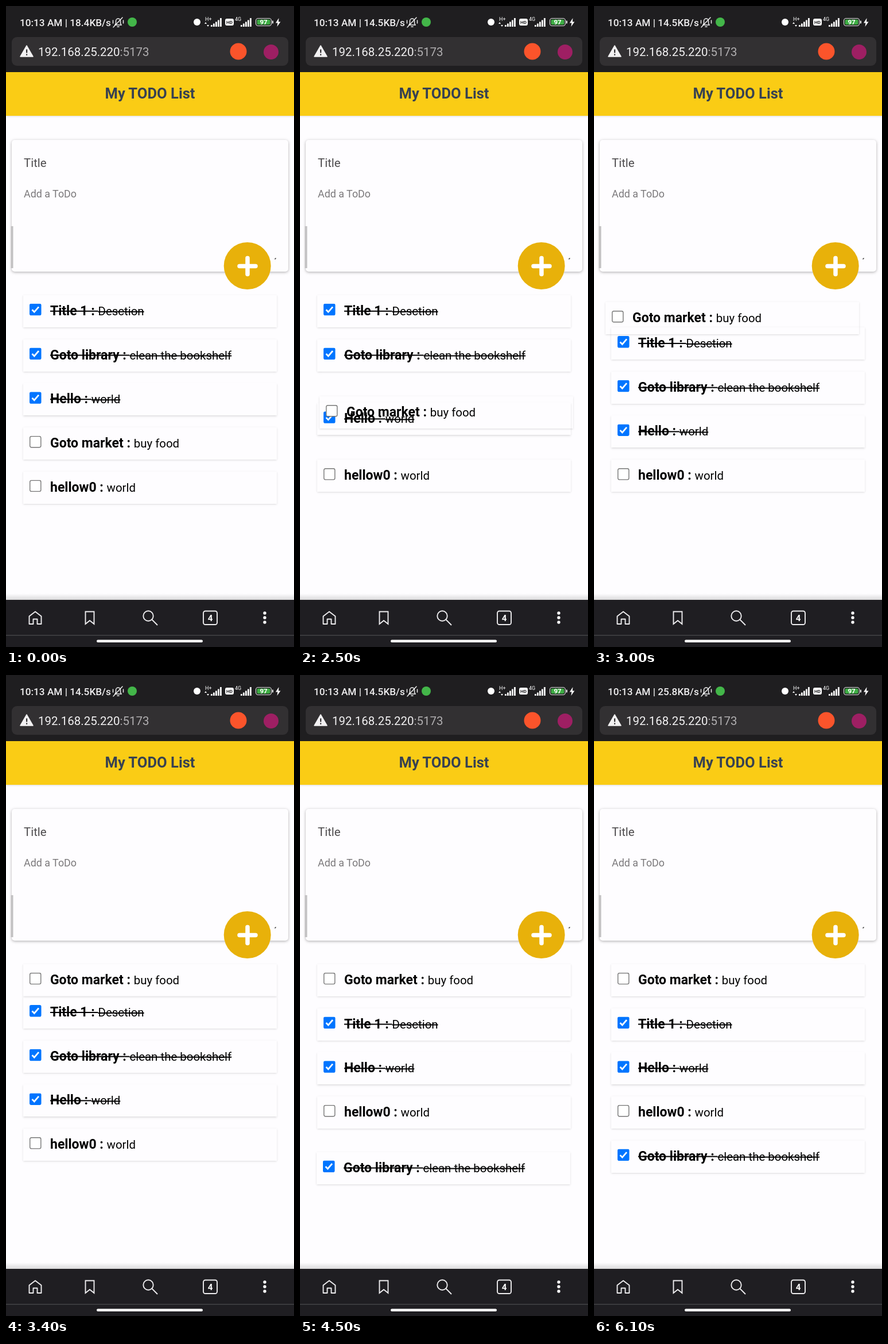
Recreate the animation shown at these times as an HTML page. Size 502 by 1115 pixels, loop 6200 ms.

```html
<!DOCTYPE html>
<html lang="en">
<head>
<meta charset="utf-8">
<title>Todo list</title>
<style>
html, body { margin: 0; width: 100%; height: 100%; overflow: hidden; }
body { position: relative; background: #fefdff; font-family: Roboto, sans-serif; }
body > * { position: absolute; }
header { top: 115px; width: 502px; height: 76px; background: #facc15; box-shadow: 0 1px 3px #0002;
  color: #374151; font: bold 25.55px/75px Roboto, sans-serif; text-align: center; }
.panel { left: 10px; top: 233px; width: 482px; height: 229px; border-radius: 5px; box-shadow: 0 1.3px 5px #8a8989aa; }
.row { left: 30px; top: 0; width: 442px; height: 56.2px; white-space: pre; font-size: 20.44px; line-height: 56px;
  box-shadow: 0 1.3px 3.8px #0000001a, 0 1.3px 2.6px -1.3px #0000001a; color: #000; }
.row svg { position: absolute; left: 10.5px; top: 15px; }
.row p { position: absolute; left: 47px; top: 0; margin: 0; }
.row b { font-size: 23px; }
.done b, .done span { text-decoration: line-through; }
.ui { left: 0; top: 0; z-index: 2; }
</style>
</head>
<body>
<header>My TODO List</header>
<div class="panel"></div>
<svg class="ui" width="502" height="1115" font-family="Roboto, sans-serif" fill="#fff">
  <defs>
    <linearGradient id="fade" x2="0" y2="1"><stop stop-opacity="0"/><stop offset="1" stop-opacity=".14"/></linearGradient>
    <path id="bars" d="M0 12h2.8v3H0zM4 9.5h2.8V15H4zM8 6.5h2.8V15H8zM12 3.5h2.8V15H12zM16 0h2.8v15H16z"/>
  </defs>

  <!-- status bar -->
  <path fill="#1f1e20" d="M0 0h502v115H0z"/>
  <g font-size="17.2" font-weight="500" fill="#f0eff0">
    <text x="24" y="35">10:13 AM | <tspan id="speed"></tspan>KB/s</text>
  </g>
  <g fill="none" stroke="#eee" stroke-width="1.5" stroke-linecap="round">
    <path d="M190 33h11l-1.500-3v-4a4 4 0 0 0-8 0v4zM194 36h3M187 37 203 20M186.500 25v5M204.500 25v5"/>
  </g>
  <circle cx="220" cy="28" r="8" fill="#43b649"/>
  <circle cx="333" cy="28" r="6"/>
  <text x="347" y="26" font-size="9">H+</text>
  <path d="M348 28l2 3h-4zM352 36l2-3h-4z"/>
  <use href="#bars" x="357" y="21"/>
  <rect x="382" y="22" width="15" height="12" rx="3"/>
  <text x="389.500" y="31" font-size="8" font-weight="700" text-anchor="middle" fill="#1f1e20">HD</text>
  <text x="399" y="26" font-size="9">4G</text>
  <use href="#bars" x="409" y="21"/>
  <rect x="435.500" y="21.500" width="27" height="13" rx="4" fill="#1f1e20" stroke="#ddd" stroke-width="1.200"/>
  <rect x="437.500" y="23.500" width="23" height="9" rx="2" fill="#3fae45"/>
  <path d="M464 25.500h1.500q1 2.500 0 5H464z"/>
  <text x="449" y="32.300" font-size="11.500" font-weight="700" text-anchor="middle">97</text>
  <path d="M475.500 21 470 29.500h3.500L472.500 36l6-8.500H475z"/>

  <!-- address bar -->
  <rect x="10" y="54" width="482" height="50" rx="9" fill="#323032"/>
  <path d="M36 69 47 88H25z" fill="#f2f1f2" stroke="#f2f1f2" stroke-width="1.500" stroke-linejoin="round"/>
  <path d="M35 75.500h2.200v6H35zM35 83.500h2.200v2.200H35z" fill="#323032"/>
  <text x="56" y="87" font-size="20.440" fill="#f2f1f2">192.168.25.220<tspan fill="#b0aeb0">:5173</tspan></text>
  <circle cx="405" cy="79" r="14.500" fill="#fb542b"/>
  <circle cx="462" cy="80" r="13" fill="#9e1f63"/>

  <!-- form -->
  <text x="31" y="280" font-size="20.440" fill="#4d4b4d">Title</text>
  <text x="31" y="332.500" font-size="17.900" fill="#7a787a">Add a ToDo</text>
  <rect x="8.500" y="383" width="4" height="73" fill="#c3c2c3"/>
  <path d="M468.500 440.500l2-2" stroke="#333" stroke-width="1.500"/>
  <circle cx="420.700" cy="452" r="41" fill="#e8b10a"/>
  <path d="M407 452.500h28M421 438.500v28" stroke="#fff" stroke-width="7.500" stroke-linecap="round"/>

  <!-- navigation -->
  <path fill="url(#fade)" d="M0 1022h502v11H0z"/>
  <path fill="#1f1e22" d="M0 1033h502v82H0z"/>
  <path fill="#4a494c" d="M0 1094h502v1.300H0z"/>
  <g fill="none" stroke="#eeedef" stroke-width="1.900">
    <path d="M40.500 1061.500 51 1053.500l10.500 8V1075h-7v-8.500h-7v8.500h-7z" stroke-linejoin="round"/>
    <path d="M138.500 1053.500h15V1075l-7.500-6-7.500 6z"/>
    <circle cx="248" cy="1061" r="8.700"/>
    <path d="M254.500 1067.500 264 1077"/>
    <rect x="344" y="1052.500" width="24" height="23.500" rx="3.500"/>
  </g>
  <text x="356" y="1069.500" font-size="15" font-weight="700" text-anchor="middle">4</text>
  <circle cx="451" cy="1056" r="2.700"/><circle cx="451" cy="1064" r="2.700"/><circle cx="451" cy="1072" r="2.700"/>
  <rect x="158" y="1102.500" width="185" height="4.500" rx="2.200"/>
</svg>

<script>
const LOOP = 6200, STEP = 100, GAP = 56.2, SHIFT_MS = 200;
const todos = [
  ['Title 1', 'Desction', true],
  ['Goto library', 'clean the bookshelf', true],
  ['Hello', 'world', true],
  ['Goto market', 'buy food', false],
  ['hellow0', 'world', false],
];
// order: rows before lifting; path: [time, x, y] of the held row, released at its last point;
// shifts: when a row starts to make room (open 1) or to close up (open 0)
const drags = [
  { id: 3, start: 2000, end: 3560, to: 0, order: [0, 1, 2, 3, 4], open: 1,
    path: [[2000, 0, 733], [2200, 1, 731], [2300, 2, 721], [2400, 3, 700], [2500, 4, 679],
           [2650, 2, 608], [2820, -2, 531], [2900, -4, 522], [3000, -10, 515], [3150, -8, 513]],
    shifts: { 2: 2450, 1: 2650, 0: 2810 } },
  { id: 1, start: 3950, end: 5050, to: 4, order: [3, 0, 1, 2, 4], open: 0,
    path: [[3950, 0, 676], [4000, -1, 697], [4100, -8, 735], [4250, -12, 785],
           [4400, -6, 822], [4500, -1, 829.5], [4650, 0, 831]],
    shifts: { 2: 4000, 4: 4250 } },
];
const finalOrder = [3, 0, 2, 4, 1];

const slot = i => 502.8 + 76.7 * i;
const clamp = v => Math.min(1, Math.max(0, v));
const mix = (a, b, k) => a + (b - a) * k;

function bezier(x1, y1, x2, y2) {
  const at = (a, b, s) => 3 * a * s * (1 - s) ** 2 + 3 * b * s * s * (1 - s) + s ** 3;
  return x => {
    if (x <= 0 || x >= 1) return clamp(x);
    let lo = 0, hi = 1;
    for (let i = 0; i < 24; i++) {
      const mid = (lo + hi) / 2;
      if (at(x1, x2, mid) < x) lo = mid; else hi = mid;
    }
    return at(y1, y2, lo);
  };
}
const shiftEase = bezier(.2, 0, 0, 1), dropEase = bezier(.2, 1, .1, 1);

function heldAt({ path, end, to }, t) {
  const i = path.findIndex(p => p[0] > t);
  const [t0, x0, y0] = i < 0 ? path.at(-1) : path[i - 1];
  const [t1, x1, y1] = i < 0 ? [end, 0, slot(to)] : path[i];
  let k = (t - t0) / (t1 - t0);
  if (i < 0) k = dropEase(k);
  return [mix(x0, x1, k), mix(y0, y1, k)];
}

const rows = todos.map(([title, text, done]) => {
  const row = document.createElement('div');
  row.className = done ? 'row done' : 'row';
  const box = done
    ? '<rect width="20.5" height="20.5" rx="2.8" fill="#0075ff"/><path d="M4.500 10.500 8.300 14.500 16 5.500" fill="none" stroke="#fff" stroke-width="2.700"/>'
    : '<rect x=".7" y=".7" width="19.1" height="19.1" rx="2.600" fill="#fff" stroke="#767676" stroke-width="1.400"/>';
  row.innerHTML = `<svg width="21" height="21">${box}</svg><p><b>${title} : </b><span>${text}</span></p>`;
  return document.body.appendChild(row);
});

function place(id, x, y, held) {
  rows[id].style.transform = `translate(${x}px, ${y}px)`;
  rows[id].style.zIndex = held ? 1 : 0;
}

const speed = document.getElementById('speed');

function draw(t) {
  speed.textContent = t < 1700 ? '18.4' : t < 5700 ? '14.5' : '25.8';
  const drag = drags.find(d => t < d.end);
  if (!drag || t < drag.start) {
    (drag ? drag.order : finalOrder).forEach((id, i) => place(id, 0, slot(i)));
    return;
  }
  const from = drag.order.indexOf(drag.id);
  drag.order.filter(id => id !== drag.id).forEach((id, i) => {
    let room = i >= from ? 1 : 0;
    if (id in drag.shifts) room = mix(room, drag.open, shiftEase((t - drag.shifts[id]) / SHIFT_MS));
    place(id, 0, slot(i) + GAP * room);
  });
  place(drag.id, ...heldAt(drag, t), true);
}

const begin = performance.now();
function tick() {
  const t = (performance.now() - begin) % LOOP;
  draw(Math.floor(t / STEP) * STEP);
  requestAnimationFrame(tick);
}
tick();
</script>
</body>
</html>
```
